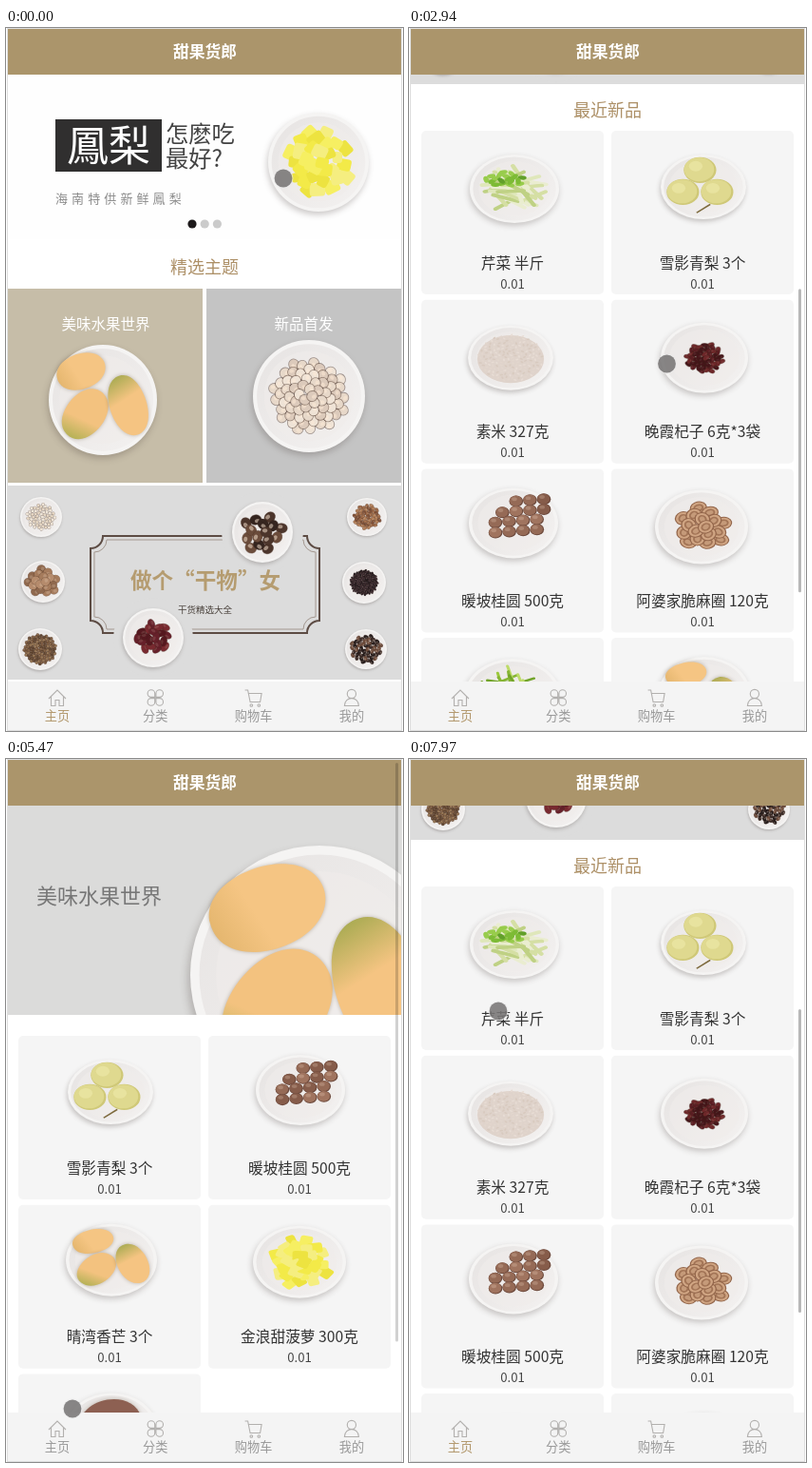
These frames come from a looping animation (418 by 739 pixels, 8000 ms). An HTML page with a canvas:

```html
<!DOCTYPE html>
<html lang="zh-CN">
<head>
<meta charset="utf-8">
<title>甜果货郎</title>
<style>
  html, body { margin: 0; width: 100%; height: 100%; overflow: hidden; background: #fff; }
  canvas { display: block; width: 418px; height: 739px; }
</style>
</head>
<body>
<canvas id="stage"></canvas>
<script>
const W = 418, H = 739, LOOP = 8000, TAU = Math.PI * 2;
const DPR = window.devicePixelRatio || 1;
const GOLD = '#ab956b', FONT = '"Noto Sans CJK SC", "Noto Sans CJK", "Noto Sans", sans-serif';
let ctx, seed = 1;

const random = () => (seed = seed * 16807 % 2147483647) / 2147483647;
const pick = list => list[Math.floor(random() * list.length)];

function layer(w, h, draw, canvas = document.createElement('canvas')) {
  canvas.width = w * DPR;
  canvas.height = h * DPR;
  ctx = canvas.getContext('2d');
  ctx.scale(DPR, DPR);
  draw();
  return canvas;
}

function rect(x, y, w, h, fill, radius = 0) {
  ctx.fillStyle = fill;
  ctx.beginPath();
  ctx.roundRect(x, y, w, h, radius);
  ctx.fill();
}

function oval(x, y, rx, ry, fill, turn = 0) {
  ctx.fillStyle = fill;
  ctx.beginPath();
  ctx.ellipse(x, y, rx, ry, turn, 0, TAU);
  ctx.fill();
}

// y is the optical middle of the glyphs
function text(s, x, y, size, color, { align = 'center', weight = 400, spacing = 0 } = {}) {
  ctx.font = `${weight} ${size}px ${FONT}`;
  ctx.textAlign = align;
  ctx.letterSpacing = spacing + 'px';
  ctx.fillStyle = color;
  ctx.fillText(s, x, y + size * 0.37);
}

// ---- food, drawn on a plate of radius 50 ----
function scatter(n, rx, ry, draw) {
  for (let i = n - 1; i >= 0; i--) {
    const angle = i * 2.4, d = Math.sqrt((i + 0.5) / n);
    ctx.save();
    ctx.translate(Math.cos(angle) * d * rx, Math.sin(angle) * d * ry);
    draw(i);
    ctx.restore();
  }
}

const bits = (n, area, r, colors, squash = 1, shine = 0.2) => () => scatter(n, area, area * 0.95, () => {
  ctx.rotate(random() * TAU);
  oval(0, 0, r + 0.7, r * squash + 0.7, 'rgba(60,35,25,.45)');
  oval(0, 0, r, r * squash, pick(colors));
  oval(-r * 0.25, -r * 0.25, r * 0.45, r * squash * 0.4, `rgba(255,235,215,${shine})`);
});

const strips = (n, length, width, colors, leaves) => () => {
  scatter(n, 25, 24, () => {
    ctx.rotate(0.5 + (random() - 0.5) * 2.2);
    rect(-length / 2, -width / 2, length, width, pick(colors), width / 2);
  });
  ctx.translate(-10, -14);
  scatter(leaves, 22, 11, () => oval(0, 0, 5, 3, pick(['#7dbb35', '#98cc4c', '#62a02a']), random() * 3));
};

function fruit(x, y, rx, ry, turn, color, tip) {
  ctx.save();
  ctx.translate(x, y);
  ctx.rotate(turn);
  const shade = ctx.createLinearGradient(-rx, ry * 0.5, rx, -ry * 0.5);
  shade.addColorStop(0, tip);
  shade.addColorStop(0.4, color);
  shade.addColorStop(1, color);
  ctx.shadowColor = 'rgba(90,70,40,.35)';
  ctx.shadowBlur = 4 * DPR;
  ctx.beginPath();
  ctx.moveTo(-rx, 0);
  ctx.bezierCurveTo(-rx, -ry * 1.25, rx * 0.95, -ry * 1.45, rx, -ry * 0.1);
  ctx.bezierCurveTo(rx, ry * 1.25, -rx, ry * 1.4, -rx, 0);
  ctx.fillStyle = shade;
  ctx.fill();
  ctx.restore();
}

const food = {
  mango() {
    fruit(-20, -25.5, 23, 16, -0.25, '#f5c583', '#e3b56d');
    fruit(-16, 13, 25, 18, -0.8, '#f3c27f', '#b0b052');
    fruit(23, 5, 28, 17, 1.3, '#f5c482', '#a6aa50');
  },
  pear() {
    for (const [x, y] of [[-4, -26], [-24, 8], [16, 8]]) {
      oval(x, y, 19, 20, '#cfc877');
      oval(x - 1, y - 1, 17.5, 18.5, '#dfd98f');
      oval(x - 5, y - 6, 8, 8, 'rgba(245,240,180,.45)');
    }
    ctx.strokeStyle = '#7d6a3d';
    ctx.lineWidth = 2;
    ctx.beginPath();
    ctx.moveTo(8, 27);
    ctx.lineTo(-8, 40);
    ctx.stroke();
  },
  pineapple: () => scatter(30, 30, 33, () => {
    ctx.rotate(random() * TAU);
    const s = 11 + random() * 6;
    rect(-s / 2, -s / 2, s, s * 0.85, pick(['#f3ea48', '#f6ef62', '#ede340', '#f5ee80']), 3);
  }),
  rings: () => scatter(17, 27, 27, () => {
    ctx.rotate(random() * 3);
    oval(0, 0, 9.5, 8.5, '#93664b');
    oval(0, 0, 8.3, 7.2, '#d0a583');
    oval(0, 0, 5.8, 4.8, '#a27456');
    oval(0, 0, 3.8, 2.8, '#c59a79');
  }),
  rice() {
    oval(0, 2, 39, 37, '#dfd3cb');
    scatter(190, 38, 36, () => oval(0, 0, 2, 1.1, pick(['#e7dcd4', '#d8cabf', '#e2d6cd']), random() * 3));
  },
  taro: () => fruit(0, -7, 34, 33, -0.2, '#8d6052', '#6d4438'),
  celery: strips(30, 34, 5, ['#eaedd0', '#d5dfa4', '#dfe7ba', '#bfd184'], 18),
  herb: strips(44, 42, 3, ['#9cc83c', '#72a42a', '#bddb68', '#86b534'], 0),
  goji: bits(46, 21, 4.2, ['#5a1d22', '#451519', '#6d2729'], 0.65, 0.08),
  longan() {
    ctx.translate(-2, -8);
    for (let i = 0; i < 15; i++) {
      const row = Math.floor((i + 2) / 4.25), x = (i + 2) % 4.25;
      ctx.save();
      ctx.translate(-26 + x * 15.5 + row % 2 * 4, -20 + row * 14 - x * 1.5);
      oval(0, 0, 7.8, 8.2, '#6c493c');
      oval(-0.4, -0.5, 7, 7.4, pick(['#956a56', '#a0745f', '#865c4a']));
      oval(-2, -3, 3, 2.6, 'rgba(255,230,210,.22)');
      ctx.restore();
    }
  },
  dates: bits(19, 27, 8.6, ['#66202a', '#55181f', '#78292f'], 0.65, 0.12),
  lotus: bits(64, 33, 4.6, ['#e7d8c9', '#dccabb', '#efe3d6'], 0.92, 0.5),
  mushroom: bits(15, 34, 9.5, ['#4c352b', '#35251f', '#6b4c3b'], 0.85, 0.5),
  seeds: bits(60, 34, 3.8, ['#ece3d6', '#e1d3c0'], 0.9, 0.4),
  nuts: bits(18, 34, 10, ['#a57b5c', '#8f684d', '#b58b6c']),
  pepper: bits(110, 37, 3.6, ['#7b5a3f', '#604530', '#90704f']),
  almonds: bits(45, 33, 6, ['#9a6746', '#7f5138', '#ad7a55'], 0.7),
  blackRice: bits(150, 31, 3.2, ['#2c2026', '#1f171c', '#3a2b31'], 0.7, 0.05),
  beans: bits(48, 37, 6, ['#3a2a26', '#251b1a', '#6b4a3a'], 0.7, 0.3)
};

function dish(x, y, rx, ry, name) {
  seed = Math.round(x * 31 + rx * 77) + 5;
  ctx.save();
  ctx.shadowColor = 'rgba(60,50,45,.26)';
  ctx.shadowBlur = Math.min(rx * 0.13, 9) * DPR;
  ctx.shadowOffsetX = -rx * 0.02 * DPR;
  ctx.shadowOffsetY = Math.min(rx * 0.06, 5) * DPR;
  oval(x, y, rx, ry, '#f5f4f3');
  ctx.restore();
  const glaze = ctx.createLinearGradient(x - rx, y - ry, x + rx, y + ry);
  glaze.addColorStop(0, '#e6e3e2');
  glaze.addColorStop(1, '#f4f2f1');
  oval(x, y, rx * 0.93, ry * 0.93, glaze);
  oval(x, y, rx * 0.8, ry * 0.8, 'rgba(240,237,236,.6)');
  ctx.save();
  ctx.translate(x, y);
  ctx.scale(rx / 50, ry / 50);
  food[name]();
  ctx.restore();
}

// ---- pages ----
const goods = {
  celery: ['芹菜 半斤', 2, 61, 47, 36],
  pear: ['雪影青梨 3个', 1, 59, 45, 34],
  rice: ['素米 327克', -2, 61, 45, 34],
  goji: ['晚霞杞子 6克*3袋', 2, 61, 46, 37],
  longan: ['暖坡桂圆 500克', 1, 57, 47, 37],
  rings: ['阿婆家脆麻圈 120克', -1, 61, 49, 39],
  herb: ['泥蒿 半斤', 0, 62, 51, 40],
  mango: ['晴湾香芒 3个', 2, 58, 48, 38],
  dates: ['霜林大枣 500克', 2, 60, 48, 37],
  pineapple: ['金浪甜菠萝 300克', 0, 60, 49, 38],
  taro: ['香芋 半斤', 2, 58, 48, 38]
};

function shelf(top, names) {
  names.forEach((name, i) => {
    const x = 13 + i % 2 * 200, y = top + Math.floor(i / 2) * 177.7;
    const [label, dx, dy, rx, ry] = goods[name];
    rect(x, y, 192, 172, '#f5f5f5', 5);
    dish(x + 96 + dx, y + dy, rx, ry, name);
    text(label, x + 96, y + 138.8, 15.7, '#333');
    text('0.01', x + 96, y + 160.7, 13.2, '#444');
  });
}

function notchedFrame(x, y, w, h, r, color, lineWidth) {
  const q = Math.PI / 2;
  ctx.beginPath();
  ctx.arc(x, y, r, q, 0, true);
  ctx.arc(x + w, y, r, 2 * q, q, true);
  ctx.arc(x + w, y + h, r, 3 * q, 2 * q, true);
  ctx.arc(x, y + h, r, 0, 3 * q, true);
  ctx.closePath();
  ctx.strokeStyle = color;
  ctx.lineWidth = lineWidth;
  ctx.stroke();
}

const slide = layer(414, 173, () => {
  rect(0, 0, 414, 173, '#fefefe');
  rect(50, 47, 112, 55, '#302f2f');
  text('鳳梨', 106, 75, 44, '#fff');
  text('怎麽吃', 166, 62, 24.3, '#444', { align: 'left' });
  text('最好?', 166, 88, 24.3, '#444', { align: 'left' });
  text('海南特供新鲜鳳梨', 50, 130, 13, '#8b8b8b', { align: 'left', spacing: 4.1 });
  dish(327, 92, 53, 52, 'pineapple');
});

const home = layer(W, 1640, () => {
  rect(0, 0, W, 1640, '#fff');
  text('精选主题', 209, 251, 18, '#ad9067');
  rect(2, 274, 205, 204, '#c6bda8');
  rect(211, 274, 205, 204, '#c4c4c4');
  text('美味水果世界', 105, 311, 15.5, '#fff');
  text('新品首发', 313.5, 311, 15.5, '#fff');
  dish(102, 391, 57, 58, 'mango');
  dish(319, 387, 59, 59, 'lotus');

  rect(2, 481, 414, 204, '#dcdcdc');
  notchedFrame(89, 534, 241, 102, 13, '#5d4c44', 2);
  notchedFrame(93, 538, 233, 94, 13, '#a3978f', 1);
  oval(270, 530, 43, 43, '#dcdcdc');
  oval(155, 641, 42, 42, '#dcdcdc');
  text('做个“干物”女', 210, 581, 22.6, '#b59c70', { weight: 900 });
  text('干货精选大全', 209.5, 611, 9.5, '#4a423c');
  dish(270, 530, 32, 32, 'mushroom');
  dish(155, 641, 32, 31, 'dates');
  dish(37, 514, 22, 21, 'seeds');
  dish(39, 582, 23, 22, 'nuts');
  dish(36, 653, 23, 22, 'pepper');
  dish(380, 514, 21, 20, 'almonds');
  dish(377, 583, 23, 22, 'blackRice');
  dish(379, 653, 22, 21, 'beans');

  text('最近新品', 209, 712, 18, '#ad9067');
  shelf(734, ['celery', 'pear', 'rice', 'goji', 'longan', 'rings', 'herb', 'mango', 'dates', 'pineapple']);
});

const detail = layer(W, 862, () => {
  rect(0, 0, W, 862, '#fff');
  ctx.save();
  ctx.beginPath();
  ctx.rect(2, 49, 414, 220);
  ctx.clip();
  rect(2, 49, 414, 220, '#dbdbda');
  dish(330, 227, 136, 136, 'mango');
  ctx.restore();
  text('美味水果世界', 98, 143.5, 22, '#777', { weight: 300 });
  shelf(291, ['pear', 'longan', 'mango', 'pineapple', 'taro']);
});

// ---- motion: [time, value, ...] keys ----
const smooth = p => p * p * (3 - 2 * p);

function track(keys, t, ease = p => p) {
  const next = keys.findIndex(key => key[0] > t);
  if (next < 0) return keys[keys.length - 1].slice(1);
  if (next === 0) return keys[0].slice(1);
  const a = keys[next - 1], b = keys[next];
  const p = ease((t - a[0]) / (b[0] - a[0]));
  return a.slice(1).map((v, i) => v + (b[i + 1] - v) * p);
}

const homeScroll = [[1985, 0], [2010, 23], [2470, 700], [2860, 700], [2940, 627], [3560, 0],
  [6450, 0], [6480, 25], [7010, 900], [7640, 900], [7970, 600]];
const detailScroll = [[4390, 0], [4410, 2], [4450, 2], [4550, 121], [4780, 121], [5250, 0]];
const bannerShift = [[290, 0], [620, -182], [900, -414], [1150, -414], [1450, -226], [1780, -22], [1940, 0]];
const pointer = [[290, 292, 158], [620, 110, 152], [1150, 110, 152], [1450, 298, 156], [1720, 279.5, 375],
  [1800, 279.5, 375], [1940, 273.5, 352.5], [2860, 273.5, 352.5], [2940, 271.5, 353], [3650, 271.5, 353],
  [4080, 129, 368], [4780, 129, 368], [5470, 70, 683], [5660, 58, 705], [6000, 58, 705], [6400, 175, 495],
  [7400, 175, 495], [7640, 94, 265]];
const barShown = [[1990, 3660], [4380, 5600], [6460, 7260], [7620, 8200]];
const DETAIL_FROM = 4100, DETAIL_TO = 5780;

const icons = [
  'M-9 1L0-8L9 1M-6.5-1V8.5H-2V2.5H2V8.5H6.5V-1',
  'M-.6-4.4a3.8 3.8 0 1 0-3.8 3.8H-.6ZM.6-4.4a3.8 3.8 0 1 1 3.8 3.8H.6ZM-.6 4.4a3.8 3.8 0 1 1-3.8-3.8H-.6ZM.6 4.4a3.8 3.8 0 1 0 3.8-3.8H.6Z',
  'M-9-8H-6L-3.5 4.5H7L8.5-4.5H-5M-1 8a1.3 1.3 0 1 1-2.6 0a1.3 1.3 0 1 1 2.6 0M7 8a1.3 1.3 0 1 1-2.6 0a1.3 1.3 0 1 1 2.6 0',
  'M4.6-4a4.6 4.6 0 1 1-9.2 0a4.6 4.6 0 1 1 9.2 0M-7.5 8.5C-7.5-2 7.5-2 7.5 8.5Z'
].map(d => new Path2D(d));

function tabBar(homeActive) {
  rect(2, 687, 414, 51, '#f4f4f4');
  ['主页', '分类', '购物车', '我的'].forEach((label, i) => {
    const x = 54 + i * 103.3;
    ctx.save();
    ctx.translate(x, 704);
    ctx.strokeStyle = '#b2b0ae';
    ctx.lineWidth = 1.1;
    ctx.stroke(icons[i]);
    ctx.restore();
    text(label, x, 723, 13.2, i === 0 && homeActive ? '#b1966a' : '#999');
  });
}

function banner(t, scroll) {
  const [shift] = track(bannerShift, t), top = 49 - scroll;
  rect(2, top, 414, 173, '#fefefe');
  ctx.drawImage(slide, 2 + shift, top, 414, 173);
  rect(416 + shift, top, 414, 173, '#dfe2e8');
  const current = shift < -207 ? 1 : 0;
  for (let i = 0; i < 3; i++) oval(196 + i * 13.2, top + 157, 4.6, 4.6, i === current ? '#1d1a1b' : '#cbcbcb');
}

function scrollBar(t, scroll, contentHeight) {
  const shown = barShown.find(([from, to]) => t >= from && t < to);
  if (!shown) return;
  const alpha = Math.min(1, (shown[1] - t) / 200) * 0.28;
  const ratio = 708 / contentHeight;
  rect(410, 4 + scroll * ratio, 3, H * ratio, `rgba(0,0,0,${alpha})`, 1.5);
}

const stage = document.getElementById('stage');
const view = layer(W, H, () => {}, stage).getContext('2d');

function render(t) {
  ctx = view;
  const onDetail = t >= DETAIL_FROM && t < DETAIL_TO;
  const scroll = Math.round(track(onDetail ? detailScroll : homeScroll, t)[0]);
  rect(0, 0, W, H, '#fff');
  ctx.save();
  ctx.beginPath();
  ctx.rect(2, 49, 414, 689);
  ctx.clip();
  const page = onDetail ? detail : home;
  ctx.drawImage(page, 0, -scroll, W, page.height / DPR);
  if (!onDetail) banner(t, scroll);
  tabBar(!onDetail);
  ctx.restore();

  rect(2, 1, 414, 48, GOLD);
  text('甜果货郎', 209.5, 25, 16.8, '#fff', { weight: 700 });
  scrollBar(t, scroll, onDetail ? 860 : 1640);
  ctx.strokeStyle = '#dedede';
  ctx.lineWidth = 1;
  ctx.strokeRect(1.5, 0.5, 415, 738);

  const [x, y] = track(pointer, t, smooth);
  oval(x, y, 10.5, 10.5, 'rgba(235,235,235,.6)');
  oval(x, y, 9.4, 9.4, 'rgba(85,82,82,.68)');
}

function tick(now) {
  render(now % LOOP);
  requestAnimationFrame(tick);
}
render(0);
requestAnimationFrame(tick);
</script>
</body>
</html>
```
